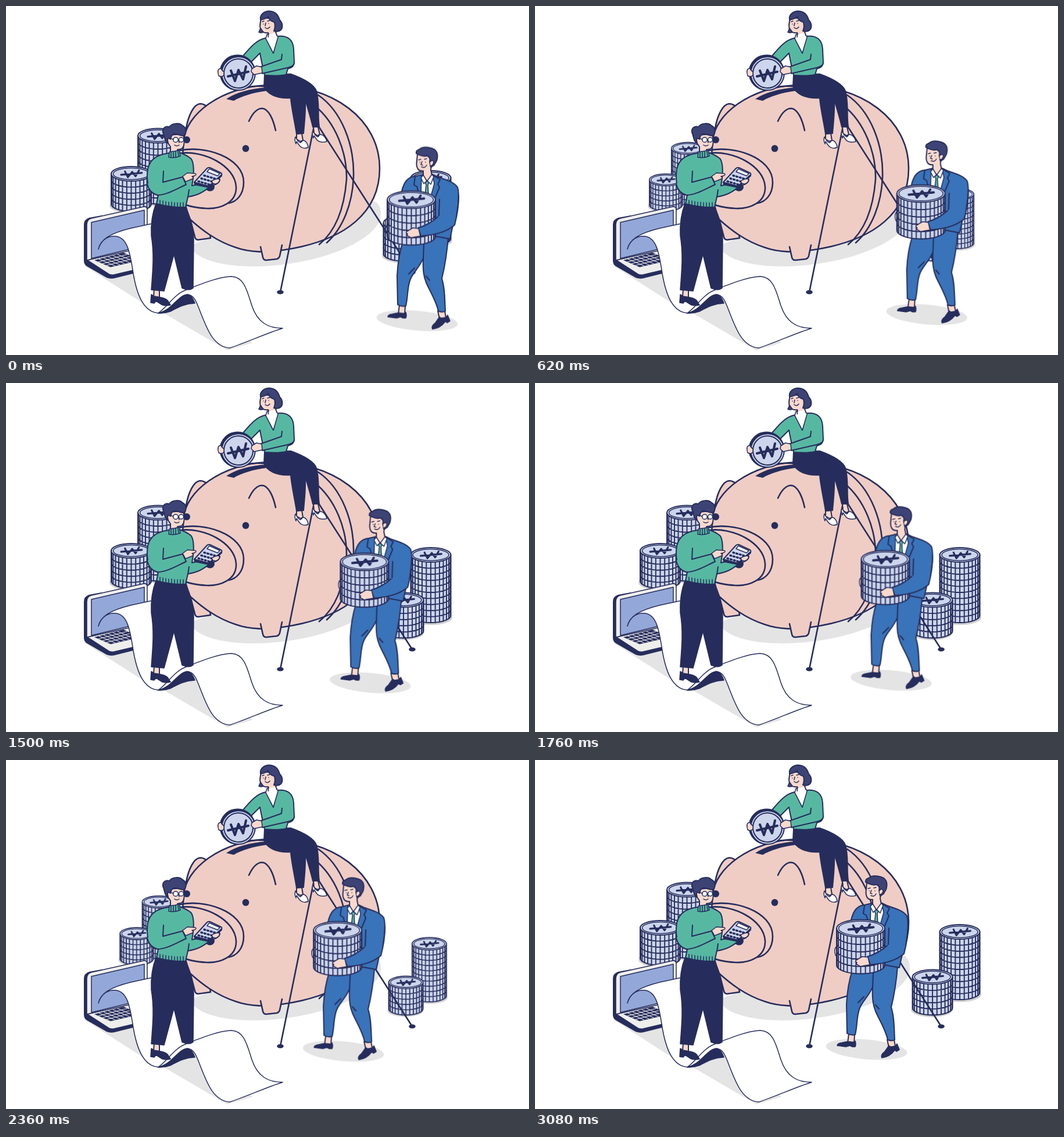
An HTML page for the animation above (6 s loop, 900 px wide and 600 px high).

```html
<!DOCTYPE html>
<html lang="en">
<head>
<meta charset="utf-8">
<title>Saving together</title>
<style>
  html, body { margin: 0; width: 100%; height: 100%; overflow: hidden; background: #fff; }
  svg { display: block; width: 900px; height: 600px; }
  svg * { stroke-linecap: round; stroke-linejoin: round; }
  .ink { stroke: #262d5c; stroke-width: 2; fill: none; }
  .thick { stroke-width: 2.6; }
  .thin { stroke-width: 1.5; }
  .navy { fill: #262d5c; }
  .hair { fill: #3d4374; }
  .pig { fill: #efcdc5; }
  .skin { fill: #f9d9cc; }
  .green { fill: #57b8a2; }
  .blue { fill: #3973b9; }
  .coin { fill: #ccd5ec; }
  .white { fill: #fff; }
  .grey { fill: #eeeeec; }
  .screen { fill: #93a8d8; }
  .shade { fill: #e4e4e4; }
  .shade2 { fill: #cfcfd1; }
</style>
</head>
<body>
<svg viewBox="0 0 900 600">
  <!-- ground shadows -->
  <path class="shade" d="M316 412C330 444 400 450 450 447C560 440 645 396 645 358C645 342 638 336 628 334L400 380Z"/>
  <path class="shade" d="M134 446L242 515L268 526L381 592L424 579L330 500L300 480L210 440Z"/>
  <ellipse class="shade" cx="298" cy="503" rx="61" ry="14" transform="rotate(-5 298 503)"/>

  <!-- piggy bank -->
  <g class="ink thick">
    <path class="pig" d="M318 370L325 397Q326 402 331 402L352 399L350 385"/>
    <path class="pig" d="M310 210C314 188 323 169 334 168C341 168 345 172 350 177"/>
    <path class="pig" d="M306 232C308 188 370 138 452 136C564 134 643 196 643 279C643 352 588 404 474 420C450 424 420 424 395 415C361 404 336 384 317 367C300 330 302 270 306 232Z"/>
    <path d="M537 153C577 180 600 238 598 295C596 340 580 382 552 407M532 172C566 200 587 250 586 298C582 350 566 388 539 410"/>
    <path class="pig" d="M438 414L442 432Q443 437 448 437L466 435Q470 434 471 430L475 411"/>
    <path d="M418 198C424 185 432 176 441 176C452 177 460 195 464 214"/>
    <path d="M297 249C340 238 409 260 409 303C409 325 396 337 383 339"/>
    <path d="M300 253C340 248 394 274 396 311C397 339 368 349 345 348C328 347 314 345 303 339"/>
    <path d="M414 140Q430 136 450 139"/>
  </g>
  <path class="navy" d="M379 160C395 149 420 142 448 140V146C425 149 405 155 392 163Z"/>
  <circle class="navy" cx="412.5" cy="245" r="5.9"/>
  <circle class="navy" cx="311" cy="230" r="6"/>
  <ellipse class="navy" cx="351" cy="311" rx="8" ry="7.5"/>

  <g id="leftPile"></g>
  <g id="rightPile"></g>

  <!-- ropes -->
  <path class="ink thick" d="M530 207L472 492M538 207L699 458"/>
  <ellipse class="navy" cx="472" cy="492" rx="5.8" ry="3.5"/>
  <ellipse class="navy" cx="699" cy="458" rx="5.8" ry="3.5"/>

  <!-- laptop -->
  <path class="navy" d="M134 376Q134 367 143 364L165 360V438L185 460L243 447V454L187 468Q180 470 173 467L140 448Q134 445 134 438Z"/>
  <g class="ink thin">
    <path class="grey" d="M140 437L236 414L280 440L186 462Q181 463 177 461Z"/>
    <path class="grey" d="M139 376Q139 367 147 365L237 345Q243 344 243 351V414L139 437Z"/>
    <path class="screen" d="M147 372L238 351V412L147 434Z"/>
  </g>
  <path class="navy" d="M152 437L202 424L232 437L180 449Z"/>
  <path stroke="#eeeeec" fill="none" d="M159 440L209 427M166 443L216 430M173 446L223 433M160 435L188 447M168 433L196 445M176 431L204 443M184 429L212 441M192 427L220 439"/>

  <!-- receipt -->
  <g class="ink thin">
    <path class="white" d="M159 418C162 402 178 391 215 382L252 374C288 380 293 430 296 450C299 470 303 482 310 488L290 520L262 528C236 526 225 495 219 460C213 420 208 399 190 396C176 394 164 402 159 418Z"/>
    <path class="white" d="M262 528C278 517 290 495 310 488C335 478 365 466 387 465C410 465 415 490 423 515C433 545 452 554 476 554C450 562 415 578 385 588C357 586 346 555 336 530C328 510 325 497 312 496C298 497 285 525 262 528Z"/>
    <path class="navy" d="M262 528C287 522 296 497 312 496C318 496 322 503 325 511C305 512 293 520 283 525Q272 529 262 528Z"/>
  </g>

  <!-- man with calculator -->
  <g class="ink">
    <path class="skin" d="M255 486L254 500L264 501V488Z"/>
    <path class="navy thin" d="M250 496L255 499C262 501 272 500 278 506L283 514Q276 516 269 514L258 507L255 511L249 510Z"/>
    <path class="navy thin" d="M258 340L309 345C318 365 323 385 323 402L322 485Q317 489 309 487L303 485L289 427L272 490L250 488C253 450 255 425 250 395C249 370 252 355 258 340Z"/>
    <path class="skin" d="M356 300Q368 294 368 299Q366 307 352 309L347 304Z"/>
    <path class="green" d="M280 253C262 255 248 262 244 280C241 300 243 318 262 325L259 340Q285 347 309 346L313 328C330 326 343 318 352 309L346 303L320 309C324 290 324 268 318 262Q310 256 299 252Z"/>
    <path class="green" d="M271 284L270 303L304 294L310 307C294 314 277 325 260 325C250 322 245 315 243 306"/>
    <path d="M313 329L315 316"/>
    <path class="thin" d="M265 334V341M270 335V342M275 336V343M280 337V344M285 337V344M290 338V345M295 338V345M300 338V345M305 338V345"/>
    <path class="skin" d="M280 222L305 220C308 234 307 243 301 246L295 247L296 250L283 251V242L279 236C275 232 277 226 281 226Z"/>
    <path class="green thin" d="M281 251Q290 250 298 248L300 258Q290 262 280 260ZM284 252V260M288 251V260M292 250V259M296 250L297 258"/>
    <path class="hair" d="M270 217C269 209 275 206 281 208C286 200 300 201 304 206C311 209 311 219 306 223C299 224 292 217 287 221C284 223 284 226 283 229Q278 225 278 231L279 236C272 232 274 226 270 217Z"/>
    <g class="thin"><circle class="white" cx="292" cy="230" r="4.3"/><circle class="white" cx="301.5" cy="230" r="4"/>
    <path d="M283 228L288 229M290 239Q294 242 298 239M297 231L298 235"/></g>
    <path class="navy" d="M324 303L349 309L371 289L371 292L350 312L325 307Z"/>
    <path class="coin" d="M324 303L346 279Q348 277 351 278L370 287Q373 289 370 291L351 308Q349 310 346 309Z"/>
    <path class="white thin" d="M350 280L368 288L364 292L346 285Z"/>
    <g id="keys"></g>
    <path class="skin thin" d="M304 293L312 287L326 288Q329 290 324 292L320 293Q325 296 319 298L309 302Z"/>
    <path class="skin thin" d="M354 301Q359 297 367 297Q369 303 361 306L356 305Z"/>
  </g>

  <!-- woman on top -->
  <g class="ink">
    <path class="skin" d="M500 218V229L507 233L511 231L509 219ZM529 207L530 219L536 223L540 221L537 208Z"/>
    <path class="white thin" d="M498 225C500 229 503 235 507 235L511 231C516 231 520 238 520 243C514 246 508 244 505 240L500 233L499 237Q496 231 498 225Z"/>
    <path class="white thin" d="M528 215C530 219 533 225 537 225L540 221C546 220 551 227 552 233C546 235 538 234 535 230L530 223L529 227Q526 221 528 215Z"/>
    <path class="navy" d="M445 118L490 117C512 125 530 135 534 146C540 165 536 190 539 207L528 208C524 190 519 176 515 160C516 185 513 205 512 219L500 220C497 200 491 175 490 158C465 160 448 150 444 138Z"/>
    <path class="green" d="M447 55C432 58 422 69 406 88L420 98L437 81C440 98 443 110 445 119Q468 121 482 118L485 108C493 106 496 102 496 97L495 74C494 58 485 50 467 52L460 81Z"/>
    <path class="white thin" d="M449 49L465 47L468 54L460 81L447 56Z"/>
    <path class="skin" d="M440 20C436 30 436 40 441 44C445 47 451 46 451 46L452 53L465 51L464 40L466 22Z"/>
    <path class="white" stroke="none" d="M452 49L465 46L467 54L452 57Z"/>
    <path class="thin" d="M452 47L451 53M464 45L466 51"/>
    <path class="hair" d="M438 24C436 14 446 8 455 9C465 10 469 17 471 24C476 29 477 37 473 41Q469 45 461 43Q464 36 462 28C456 27 452 22 451 18C447 23 441 23 438 24Z"/>
    <path class="hair thin" d="M438 38L435 45Q439 47 443 45Z"/>
    <path class="thin" d="M446 37Q450 41 454 36M441 27L444 26M450 26L454 25M447 29L446 34"/>
    <circle class="navy" cx="443" cy="31" r=".8" stroke="none"/><circle class="navy" cx="452" cy="30" r=".8" stroke="none"/>
    <circle class="navy" cx="398.5" cy="114.5" r="30"/>
    <circle class="coin" cx="400" cy="116" r="28.8"/>
    <circle cx="400" cy="116" r="25"/>
    <path style="stroke-width:4" d="M387 111L394 129L400 110L408 126L413 104M382 121L417 113"/>
    <path class="skin thin" d="M367 108Q363 110 366 120Q371 123 375 119V113Q371 111 370 107Z"/>
    <path class="green" d="M475 83L474 92L437 105L441 116L485 106C493 104 496 101 496 97"/>
    <path class="skin thin" d="M440 105L431 103L423 108L422 113L427 118L441 115Z"/>
  </g>

  <!-- man carrying coins -->
  <g id="carrier" class="ink">
    <ellipse class="shade" stroke="none" cx="570.5" cy="497.5" rx="70" ry="17" transform="rotate(5 570.5 497.5)"/>
    <path class="skin" d="M540 470L538 487L549 487L550 472ZM606 481L609 494L620 492L618 481Z"/>
    <path class="navy thin" d="M538 484L548 485L551 483Q553 488 551 493L546 493L542 491L535 493L520 491Q520 487 528 486Z"/>
    <path class="navy thin" d="M609 491Q614 496 619 493L623 488L627 498L622 501L619 499C613 507 605 511 597 512Q594 507 602 501Z"/>
    <path class="blue" d="M546 362C540 380 537 400 536 420L537 470Q544 474 551 472C555 458 553 440 559 426C564 414 576 404 581 390C580 412 582 422 586 432C594 450 603 463 607 481Q614 484 619 481C618 460 618 440 613 425C618 405 622 380 624 354L600 348Z"/>
    <path d="M582 366L581 392M556 417L566 407M586 421L592 428"/>
    <path class="blue" d="M568 249C555 250 548 258 544 275L530 310L560 350L600 352L627 357L632 334C641 315 644 280 640 268C633 258 618 255 605 250L597 246L581 246Z"/>
    <path class="white thin" d="M578 248L582 245L597 246L600 262L594 284H577Z"/>
    <path class="green thin" d="M584 259L588 257L591 260L589 264L590 282H584L586 264Z"/>
    <path class="skin" d="M571 211L594 213C598 225 594 234 594 238L596 248L588 258L581 249V240C572 241 568 234 570 222Z"/>
    <path class="white thin" d="M581 247L587 257L582 262L577 252ZM596 246L588 257L594 263L599 250Z"/>
    <path class="hair" d="M569 210C568 203 575 204 577 201C585 197 596 201 600 203C606 207 606 214 605 219C605 224 601 226 600 230L594 234L592 224C594 217 590 216 588 214C581 216 574 213 569 210Z"/>
    <path class="skin thin" d="M593 224Q598 220 599 225Q598 231 593 231"/>
    <path class="thin" d="M578 233Q584 236 587 230M573 221L577 220M583 220L587 219M579 224L577 229L580 230"/>
    <circle class="navy" cx="575.5" cy="225" r=".8" stroke="none"/><circle class="navy" cx="585" cy="225" r=".8" stroke="none"/>
    <path d="M567 250L565 264L570 267L574 280M600 249L610 255L606 263L609 268L602 285"/>
    <path class="skin thin" d="M520 320Q515 323 516 331Q517 339 523 340L527 330Z"/>
    <g id="held"></g>
    <path class="blue" stroke="none" d="M572 338L606 321L609 290L640 290L636 333Q618 347 577 352Z"/>
    <path d="M609 289L608 317M606 319C596 328 584 335 572 338L577 352C600 350 620 346 635 333C639 318 642 300 642 283"/>
    <path class="skin thin" d="M573 339L563 338L553 344Q550 347 554 348Q552 352 557 353Q559 356 564 354L576 352Z"/>
  </g>
</svg>
<script>
const $ = id => document.getElementById(id);
const LOOP = 6000;

// Pile of coins: cx, cy is the centre of the top face.
function pile(cx, cy, rx, ry, h, coins, ribs) {
  const arc = y => `M${cx - rx} ${y}A${rx} ${ry} 0 0 0 ${cx + rx} ${y}`;
  let lines = '';
  for (let i = 1; i < coins; i++) lines += arc(cy + h * i / coins);
  for (let i = 1; i < ribs; i++) {
    const a = Math.PI * i / ribs;
    const x = cx - rx * Math.cos(a), y = cy + ry * Math.sin(a);
    lines += `M${x.toFixed(1)} ${y.toFixed(1)}v${h}`;
  }
  const k = rx / 41.5;
  return `<g class="ink">
    <path class="coin" d="${arc(cy + h)}V${cy}H${cx - rx}Z"/>
    <path style="stroke-width:1.9" d="${lines}"/>
    <ellipse class="coin" cx="${cx}" cy="${cy}" rx="${rx}" ry="${ry}"/>
    <ellipse class="thin" cx="${cx}" cy="${cy}" rx="${rx - 3.5}" ry="${ry - 2.5}"/>
    <path transform="translate(${cx} ${cy}) scale(${k})" style="stroke-width:3.8"
      d="M-13 -5L-7 7L2 -4L9 5L16 -7M-21 2L22 -2"/></g>`;
}

const shadow = (x, y) =>
  `<ellipse class="shade2" cx="${x}" cy="${y}" rx="36" ry="13"/>`;

$('leftPile').innerHTML =
  shadow(260, 331) + pile(261.5, 223, 34.5, 12.5, 105, 10, 14) +
  shadow(214, 343) + pile(215.5, 288.5, 34.5, 12.5, 52, 5, 14);
$('rightPile').innerHTML =
  shadow(732, 403) + pile(731, 295.5, 34.5, 12.5, 104, 10, 14) +
  shadow(683, 429) + pile(684, 373, 34.5, 12.5, 53, 5, 14);
$('held').innerHTML = pile(560.5, 289.5, 41.5, 15, 63, 5, 16);

let keys = '';
for (let i = 0; i < 4; i++) for (let j = 0; j < 3; j++) {
  const x = 331 + i * 5.6 + j * 5, y = 301.5 + i * 1.6 - j * 5;
  keys += `<path style="stroke-width:3.4" d="M${x} ${y}l1.8 .5"/>`;
}
$('keys').innerHTML = keys;

// Each step: [time in ms, transform]
function play(id, steps) {
  $(id).animate(
    steps.map(([t, transform]) => ({ offset: t / LOOP, transform })),
    { duration: LOOP, iterations: Infinity });
}

function pulse(id, origin, starts) {
  const steps = [[0, 'scale(1)']];
  $(id).style.transformOrigin = origin;
  for (const t of starts)
    steps.push([t, 'scale(1)'], [t + 500, 'scale(.77)'], [t + 1000, 'scale(1)']);
  steps.push([LOOP, 'scale(1)']);
  play(id, steps);
}

pulse('leftPile', '271px 348px', [0, 1995]);
pulse('rightPile', '713px 438px', [50, 2050]);

play('carrier', [
  [0, 'translate(137px, 43.5px)'],
  [2550, 'translate(0px, 0px)'],
  [LOOP, 'translate(0px, 0px)']
]);
</script>
</body>
</html>
```
